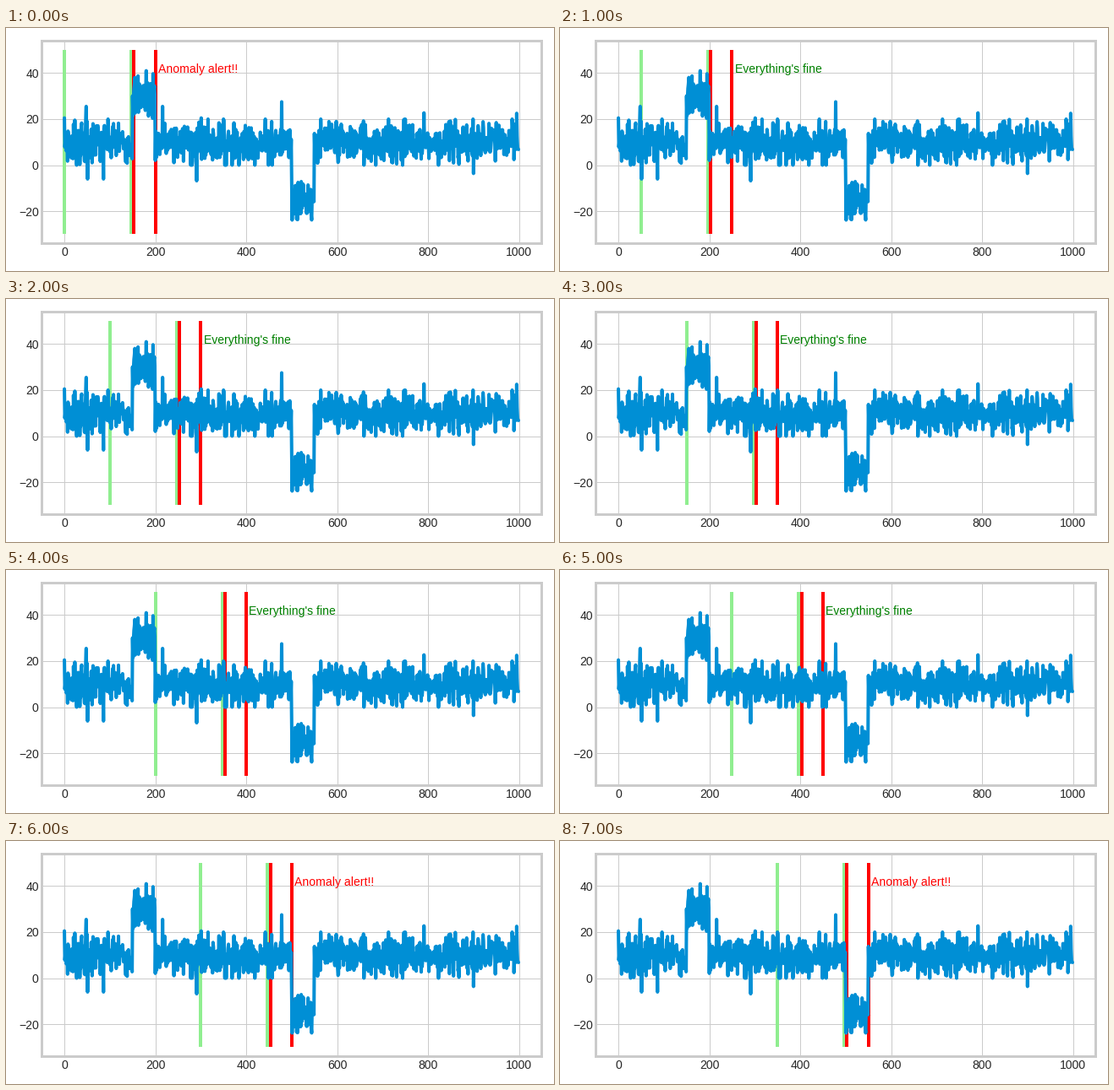
A matplotlib script for the animation above (8000 ms loop, 648x288 px).

```python
import numpy as np
import matplotlib.pyplot as plt
from matplotlib.animation import FuncAnimation

W, H, DPI = 648, 288, 72
LEFT, RIGHT, TOP, BOTTOM = 42.2, 632.88, 15.12, 255.4  # plot box in pixels
GREY, BLUE, INK = "#cbcbcb", "#008fd5", "#262626"
TRAIN, WINDOW, STEP, GAP = 150, 200, 50, 3

# The strongest outliers: sample index and value
SPIKES = {0: 20.5, 48: 25.5, 51: -6, 86: -6, 180: 41, 216: 25.5, 291: -6.8,
          301: 20.5, 478: 27.5, 791: 22.7, 900: -3.6, 995: 22.5}

plt.rcParams.update({"font.family": "Liberation Sans", "font.size": 14})


def make_signal():
    """Noise around 10 with one raised and one sunken stretch."""
    rng = np.random.RandomState(7)
    y = np.clip(rng.normal(10, 4.7, 1000), 0, 20)
    y[150:200] += 20
    y[500:550] -= 25
    for i, value in SPIKES.items():
        y[i] = value
    return y


def is_anomaly(y, start):
    """True if the test window leaves three deviations of the training window."""
    train = y[start:start + TRAIN]
    test = y[start + TRAIN:start + WINDOW]
    return np.any(np.abs(test - train.mean()) > 3 * train.std())


signal = make_signal()

fig = plt.figure(figsize=(W / DPI, H / DPI), dpi=DPI, facecolor="white")
ax = fig.add_axes([LEFT / W, 1 - BOTTOM / H,
                   (RIGHT - LEFT) / W, (BOTTOM - TOP) / H])
ax.set(xlim=(-49.95, 1048.95), ylim=(-34, 54),
       xticks=range(0, 1001, 200), yticks=range(-20, 41, 20))
ax.set_axisbelow(True)
ax.grid(color=GREY, lw=1)
ax.tick_params(length=0, pad=3.5, labelcolor=INK)
for spine in ax.spines.values():
    spine.set(color=GREY, linewidth=3)

ax.plot(signal, color=BLUE, lw=4, zorder=2,
        solid_capstyle="round", solid_joinstyle="round")


def marker(color):
    return ax.plot([0, 0], [-30, 50], color=color, lw=4, zorder=1,
                   solid_capstyle="butt")[0]


markers = [(marker("lightgreen"), 0), (marker("lightgreen"), TRAIN - GAP),
           (marker("red"), TRAIN + GAP), (marker("red"), WINDOW)]
label = ax.text(0, 40, "", zorder=3)


def update(frame):
    start = frame * STEP
    for line, offset in markers:
        line.set_xdata([start + offset] * 2)
    alert = is_anomaly(signal, start)
    label.set_text("Anomaly alert!!" if alert else "Everything's fine")
    label.set_color("red" if alert else "green")
    label.set_x(start + WINDOW + 6)
    return [line for line, _ in markers] + [label]


anim = FuncAnimation(fig, update, frames=8, interval=1000, repeat=True)
plt.show()
```
